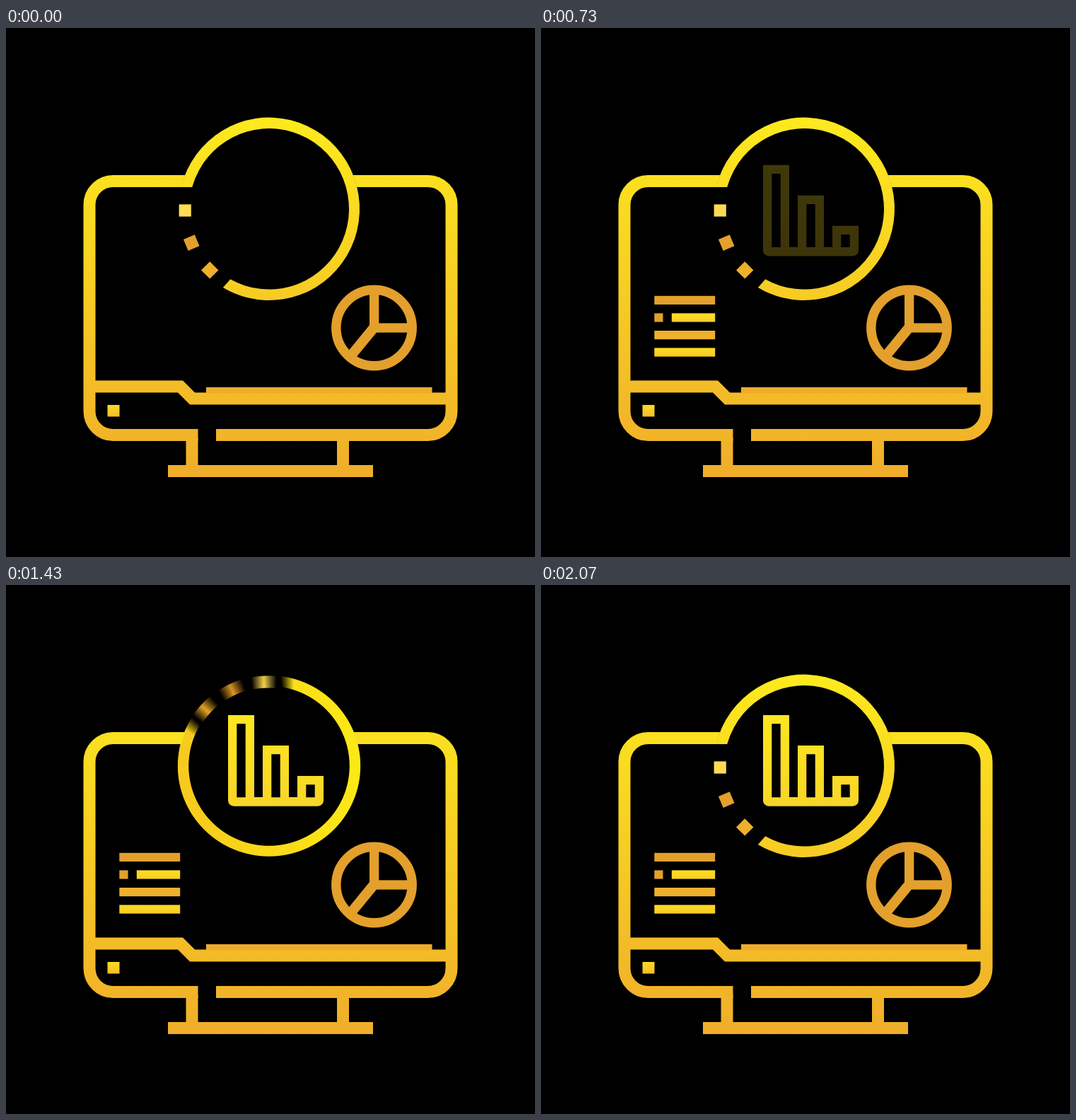
Write an HTML page with a canvas that moves like this. It is 748 px wide and 748 px high and loops after 2180 ms.

```html
<!DOCTYPE html>
<html lang="en">
<head>
<meta charset="utf-8">
<title>Dashboard monitor</title>
<style>
html, body { margin: 0; width: 100%; height: 100%; overflow: hidden; background: #000; }
canvas { display: block; width: 748px; height: 748px; }
</style>
</head>
<body>
<canvas id="stage" width="748" height="748"></canvas>
<script>
const SIZE = 748, LOOP = 2180, STEP = 100 / 3, LAST = 62;
const ctx = document.getElementById('stage').getContext('2d');
const scratch = document.createElement('canvas');
scratch.width = scratch.height = SIZE;
const sctx = scratch.getContext('2d');

const CX = 372, CY = 255.8;
const RAD = Math.PI / 180;
const OCHRE = '#e3a02c', AMBER = '#efb02c';

const clamp = x => Math.min(1, Math.max(0, x));

// Symmetric cubic-bezier(k, 0, 1 - k, 1)
function ease(x, k) {
  x = clamp(x);
  if (x === 0 || x === 1) return x;
  let lo = 0, hi = 1, s = 0.5;
  for (let i = 0; i < 24; i++) {
    s = (lo + hi) / 2;
    const q = 1 - s;
    const v = 3 * q * q * s * k + 3 * q * s * s * (1 - k) + s * s * s;
    if (v < x) lo = s; else hi = s;
  }
  return s * s * (3 - 2 * s);
}

function vertical(y0, y1, c0, c1) {
  const g = ctx.createLinearGradient(0, y0, 0, y1);
  g.addColorStop(0, c0);
  g.addColorStop(1, c1);
  return g;
}
const gold = vertical(126, 636, '#fdea1e', '#f0ad2a');

function box(x0, y0, x1, y1, fill) {
  ctx.fillStyle = fill;
  ctx.fillRect(x0, y0, x1 - x0, y1 - y0);
}

function poly(points, fill) {
  ctx.beginPath();
  points.forEach(p => ctx.lineTo(p[0], p[1]));
  ctx.closePath();
  ctx.fillStyle = fill;
  ctx.fill();
}

function monitor() {
  const l = 118, r = 630, t = 216.5, b = 575.5, c = 33.5;
  ctx.strokeStyle = gold;
  ctx.lineWidth = 17;
  ctx.beginPath();
  ctx.moveTo(248, t);
  ctx.arcTo(l, t, l, b, c);
  ctx.arcTo(l, b, r, b, c);
  ctx.lineTo(271.5, b);
  ctx.moveTo(297, b);
  ctx.arcTo(r, b, r, t, c);
  ctx.arcTo(r, t, l, t, c);
  ctx.lineTo(497, t);
  ctx.stroke();
  poly([[247, 208], [253.2, 208], [248, 225], [247, 225]], gold);
  poly([[498, 208], [490.8, 208], [496, 225], [498, 225]], gold);

  box(254.5, 580, 271.5, 620, gold);
  box(468, 580, 485, 620, gold);
  box(229, 618, 519, 635, gold);

  poly([[118, 498.5], [250, 498.5], [267, 515.5], [630, 515.5],
        [630, 532.5], [260, 532.5], [243, 515.5], [118, 515.5]], gold);
  box(283, 508, 602.5, 516.5, '#efac2c');
  box(143.5, 533, 160.5, 549.5, vertical(533, 550, '#fbdc24', '#f5ba2b'));
}

function pie() {
  const x = 520.5, y = 424;
  ctx.strokeStyle = OCHRE;
  ctx.lineWidth = 13.4;
  ctx.beginPath();
  ctx.arc(x, y, 53.7, 0, Math.PI * 2);
  ctx.stroke();
  box(514, 374, 527.3, 424, OCHRE);
  box(520, 417.4, 570, 430.6, OCHRE);
  poly([[514, 420], [520, 417.4], [527, 424], [524, 430.6], [494, 467], [483, 458]], OCHRE);
}

function textLines(t) {
  const left = 1 - ease((t - 67) / 533, 0.42);
  ctx.globalAlpha = clamp((t - 67) / 267);
  const row = (y, shift, x0, x1, fill) =>
    box(x0 + shift * left, y, x1 + shift * left, y + 12.2, fill);
  row(378.8, -19, 160.3, 246.2, OCHRE);
  row(403.4, 5, 160.3, 172.5, OCHRE);
  row(403.4, 5, 184.8, 246.2, vertical(403, 416, '#fde021', '#f9cc28'));
  row(428, -9, 160.3, 246.2, AMBER);
  row(452.4, 12, 160.3, 246.2, vertical(452, 465, '#fddc20', '#fac926'));
  ctx.globalAlpha = 1;
}

function chart(t) {
  const left = 1 - ease((t - 667) / 533, 0.42);
  ctx.save();
  ctx.globalAlpha = clamp((t - 667) / 267);
  ctx.translate(0, 10 * left);
  ctx.beginPath();
  ctx.moveTo(314, 184);
  [[351, 184], [351, 300], [363, 300], [363, 227], [400, 227], [400, 300],
   [412, 300], [412, 270], [449, 270]].forEach(p => ctx.lineTo(p[0], p[1]));
  ctx.arcTo(449, 312.7, 314, 312.7, 8);
  ctx.arcTo(314, 312.7, 314, 184, 8);
  ctx.closePath();
  [[326.3, 196.3], [375.3, 239.2], [424.3, 282.2]].forEach(
    p => ctx.rect(p[0], p[1], 12.4, 300.2 - p[1]));
  ctx.fillStyle = vertical(184, 313, '#fde621', '#f8d527');
  ctx.fill('evenodd');
  ctx.restore();
}

function dot(g, x, y, turn, fill) {
  g.save();
  g.translate(x, y);
  g.rotate(turn * RAD);
  g.fillStyle = fill;
  g.fillRect(-8.6, -8.6, 17.2, 17.2);
  g.restore();
}

function ring(g, turn) {
  g.save();
  g.translate(CX, CY);
  g.rotate(turn * RAD);
  g.translate(-CX, -CY);
  g.beginPath();
  g.ellipse(CX, CY, 128, 129.3, 0, 193.8 * RAD, 480.6 * RAD);
  g.ellipse(CX, CY, 113, 113.8, 0, 479 * RAD, 195.7 * RAD, true);
  g.closePath();
  g.fillStyle = gold;
  g.fill();
  dot(g, 253.2, 258, 0, '#fcdb55');
  dot(g, 262.2, 303.6, -23, OCHRE);
  dot(g, 288.2, 342.4, 45, AMBER);
  g.restore();
}

const angle = t => 360 * ease((t - 1100) / 966.7, 0.435);

// Averages the ring over half a step while it spins
function spin(t) {
  const open = STEP / 2;
  if (t <= 1100 || t >= 2066) return ring(ctx, 0);
  const n = 18, x = CX - 140, y = CY - 140.8, w = 280;
  for (let i = 0; i < n; i++) {
    sctx.fillStyle = '#000';
    sctx.fillRect(x, y, w, w);
    ring(sctx, angle(t + ((i + 0.5) / n - 0.5) * open));
    ctx.globalAlpha = 1 / (i + 1);
    ctx.drawImage(scratch, x, y, w, w, x, y, w, w);
  }
  ctx.globalAlpha = 1;
}

function draw(ms) {
  const t = Math.min(LAST, Math.floor((ms + 4) / STEP)) * STEP;
  box(0, 0, SIZE, SIZE, '#000');
  spin(t);
  monitor();
  pie();
  textLines(t);
  chart(t);
}

const start = performance.now();
function tick() {
  draw((performance.now() - start) % LOOP);
  requestAnimationFrame(tick);
}
tick();
</script>
</body>
</html>
```
